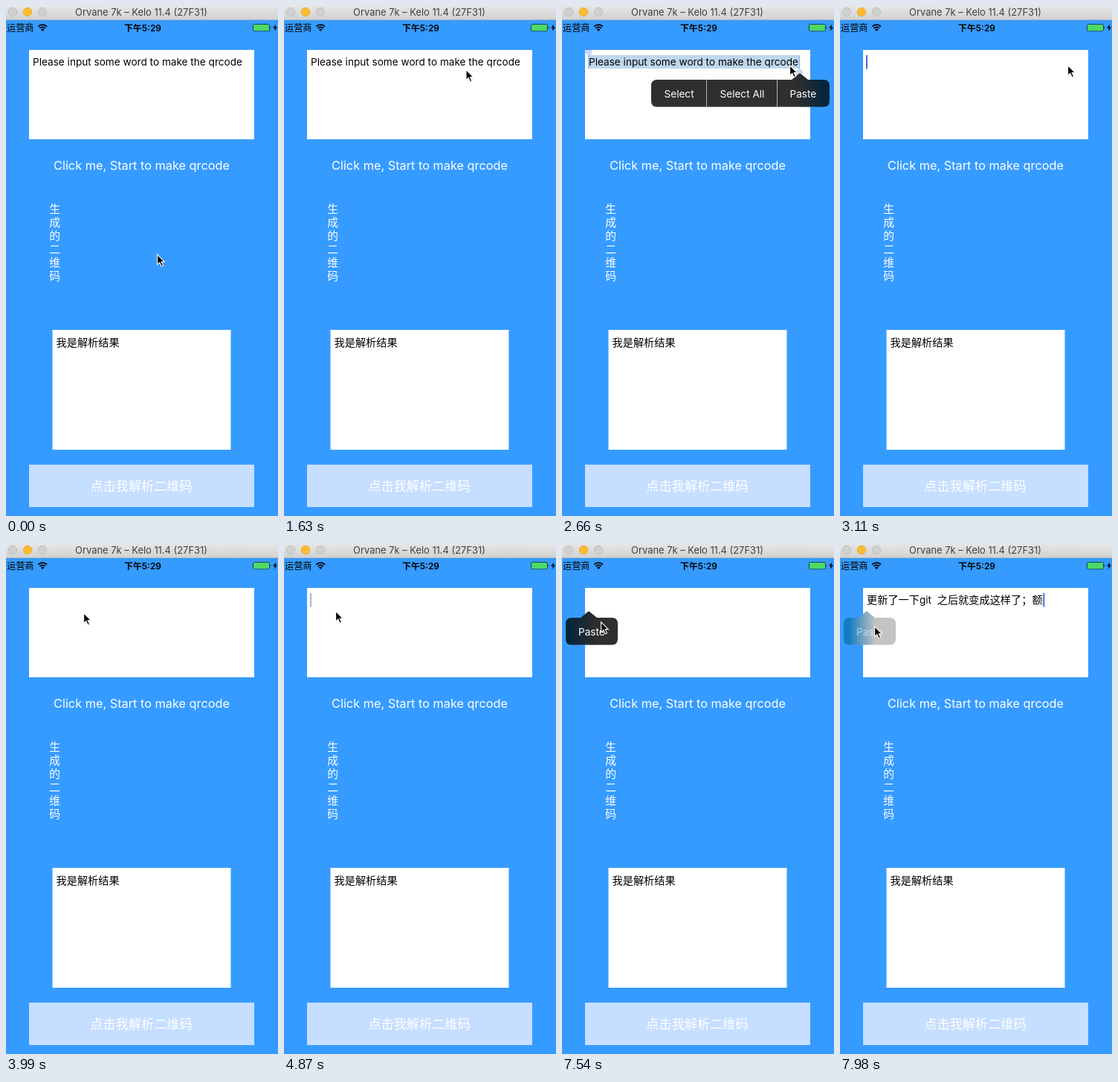
Write an HTML page that moves like this. It is 366 px wide and 685 px high and loops after 8000 ms.

```html
<!DOCTYPE html>
<html lang="en">
<head>
<meta charset="utf-8">
<title>QR code maker</title>
<style>
  html, body { margin: 0; width: 100%; height: 100%; overflow: hidden; background: #369bff; }
  svg { display: block; width: 366px; height: 685px; font-family: Inter, "Noto Sans CJK SC", "Noto Sans CJK", sans-serif; }
  .body { font-size: 13.6px; }
  .cjk { font-size: 14.2px; }
  .white { fill: #fff; }
  .mid { text-anchor: middle; }
  text { white-space: pre; }
</style>
</head>
<body>
<svg viewBox="0 0 366 685" lang="zh-CN">
  <defs id="defs">
    <linearGradient id="bar" x2="0" y2="1">
      <stop stop-color="#e6e6e6"/><stop offset="1" stop-color="#d2d2d2"/>
    </linearGradient>
  </defs>

  <rect width="366" height="685" fill="#369bff"/>

  <!-- window title -->
  <rect width="366" height="18" fill="url(#bar)"/>
  <rect y="18" width="366" height="1" fill="#b5b9be"/>
  <g stroke-width=".8">
    <circle cx="9" cy="8" r="5.7" fill="#d0d0d0" stroke="#bababa"/>
    <circle cx="29" cy="8" r="5.7" fill="#fdbc2e" stroke="#e3a62b"/>
    <circle cx="49" cy="8" r="5.7" fill="#d0d0d0" stroke="#bababa"/>
  </g>
  <text class="mid" x="182" y="13" font-size="12.9" fill="#404040">Orvane 7k – Kelo 11.4 (27F31)</text>

  <!-- status bar -->
  <text x="1" y="33.6" font-size="12.2">运营商</text>
  <g fill="none" stroke="#000" stroke-width="1.7">
    <path d="M43.3 27.6a8.2 8.2 0 0 1 11.8 0M45.4 30a5.4 5.4 0 0 1 7.6 0"/>
    <path d="M49.2 34l-2.3-2.4a3.3 3.3 0 0 1 4.6 0z" fill="#000" stroke="none"/>
  </g>
  <text class="mid" x="184" y="33.6" font-size="11.9" font-weight="600">下午5:29</text>
  <rect x="332.5" y="24.5" width="22" height="9.2" rx="1.8" fill="none" stroke="#000" stroke-width=".6"/>
  <rect x="333" y="25" width="21" height="8.2" rx="1.2" fill="#4cd964"/>
  <path d="M355.5 27.5q1.6 1.6 0 3.2z"/>
  <path d="M363.4 24.6l-4.4 5h2.8l-1 4.2 4.4-5.2h-2.8z"/>

  <!-- page -->
  <rect x="31" y="59" width="303" height="120" fill="#fff"/>
  <text class="white mid" x="182.5" y="219.7" font-size="16.3">Click me, Start to make qrcode</text>
  <g id="column" class="white mid" font-size="14.8"></g>
  <rect x="62.5" y="435" width="240" height="161" fill="#fff"/>
  <text class="cjk" x="67.5" y="456.5">我是解析结果</text>
  <rect x="31" y="616" width="303" height="57" fill="#c6deff"/>
  <text class="white mid" x="182" y="650.7" font-size="17.2">点击我解析二维码</text>

  <!-- text field -->
  <rect id="range" x="35" y="66" width="285" height="18" fill="#bfd7ee"/>
  <text id="hint" class="body" x="36" y="80.3">Please input some word to make the qrcode</text>
  <text id="pasted" class="cjk" x="36" y="80.3">更新了一下<tspan class="body">git  </tspan>之后就变成这样了；额</text>
  <g id="grips" fill="#4a72e0">
    <circle cx="36" cy="61.5" r="4.8"/><rect x="35" y="65" width="1.6" height="19"/>
    <circle cx="319.5" cy="89.5" r="4.8"/><rect x="318.8" y="66" width="1.6" height="19"/>
  </g>
  <rect id="caret" y="66" width="2" height="18.5" fill="#4a6ddf"/>

  <g id="editMenu"></g>
  <g id="pasteMenu"></g>

  <g id="pointer">
    <path d="M1 2V15.4l3.2-2.9 2.3 5.3 2.6-1.1-2.3-5.1h4.3z" fill="#000" opacity=".22"/>
    <path d="M.6 .8V14.4l3.2-2.9 2.3 5.3 2.4-1-2.3-5.2h4.2z" stroke="#fff" stroke-width="1.1"/>
  </g>
</svg>

<script>
const LOOP = 8000, STEP = 147.8;   // the picture is refreshed once per step
const SELECT = 18, CLEAR = 21, PASTE = 54;   // edits, in steps
const el = id => document.getElementById(id);
const clamp = v => Math.min(1, Math.max(0, v));
const ramp = (n, from, to) => clamp((n - from) / (to - from));
const fade = (id, alpha) => el(id).setAttribute('opacity', alpha);

// Pointer strokes: start step, end step, destination.
const home = [203, 333];
const strokes = [
  [0, 2, 207, 373], [2, 6, 152, 116], [8, 13, 306, 79], [23, 27, 104, 92],
  [27, 30, 71, 91], [31, 33, 67, 89], [46, 50, 52, 104], [51, 53, 46, 110]
];

// Steady sideways, slowing down vertically.
function pointerAt(n) {
  let [x, y] = home;
  for (const [from, to, tx, ty] of strokes) {
    const p = ramp(n, from, to);
    x += (tx - x) * p;
    y += (ty - y) * (1 - (1 - p) ** 2);
  }
  return `translate(${x} ${y})`;
}

function caretAlpha(n) {
  if (n < 13 || (n >= SELECT && n < CLEAR)) return 0;
  const steady = n < 26 || (n >= 42 && n < 47);
  return steady ? 1 : clamp(.5 - Math.sin((n - 32) * Math.PI / 3));
}

function addGradient(id, x1, x2, from, to) {
  el('defs').innerHTML +=
    `<linearGradient id="${id}" gradientUnits="userSpaceOnUse" x1="${x1}" x2="${x2}" y1="0" y2="0">` +
    `<stop stop-color="${from}"/><stop offset="1" stop-color="${to}"/></linearGradient>`;
}

// A blurred backdrop under a dark tint; only the tint and labels fade.
function buildMenu(id, x, width, tip, edge, items, lines) {
  const r = x + width;
  const shape = `M${x + 8} 99H${tip - 11}L${tip - 1.5} 91.2q1.5-1.2 3 0L${tip + 11} 99H${r - 8}` +
    `q8 0 8 8v20.5q0 8-8 8H${x + 8}q-8 0-8-8V107q0-8 8-8z`;
  addGradient(id + 'Blur', ...edge, '#189ffa', '#fff');
  addGradient(id + 'Tint', ...edge, '#06263a', '#2f2f2f');
  el(id).innerHTML =
    `<path fill="url(#${id}Blur)" d="${shape}"/><path id="${id}Dark" fill="url(#${id}Tint)" d="${shape}"/>` +
    `<g id="${id}Label">` +
    lines.map(l => `<rect x="${l}" y="99" width="1" height="36.5" fill="#b4b4b4"/>`).join('') +
    items.map(([label, left]) => `<text class="body white" x="${left}" y="122.6">${label}</text>`).join('') +
    '</g>';
}

function showMenu(id, alpha) {
  fade(id, alpha > 0 ? 1 : 0);
  fade(id + 'Dark', alpha);
  fade(id + 'Label', Math.sqrt(alpha));
}

function draw(t) {
  const n = Math.floor((t + 4) / STEP);
  const selected = n >= SELECT && n < CLEAR;
  el('pointer').setAttribute('transform', pointerAt(n));
  el('caret').setAttribute('x', n < CLEAR ? 319 : n < PASTE ? 35 : 273.3);
  fade('caret', caretAlpha(n));
  fade('hint', n < CLEAR ? 1 : 0);
  fade('pasted', n >= PASTE ? 1 : 0);
  fade('range', selected ? 1 : 0);
  fade('grips', selected ? ramp(n, 17.6, 19) : 0);
  showMenu('editMenu', n < 19 ? ramp(n, 14, 16) : 0);
  showMenu('pasteMenu', ramp(n, 48, 50) * (1 - ramp(n, 53, 54.4)));
}

buildMenu('editMenu', 120, 240, 320, [352, 314],
  [['Select', 137.5], ['Select All', 212.5], ['Paste', 306.5]], [194, 289]);
buildMenu('pasteMenu', 5, 70, 36, [12, 48], [['Paste', 22]], []);

el('column').innerHTML = [...'生成的二维码']
  .map((c, i) => `<text x="65.7" y="${278.3 + i * 17.9}">${c}</text>`).join('');

const start = performance.now();
function tick() {
  draw((performance.now() - start) % LOOP);
  requestAnimationFrame(tick);
}
draw(0);
requestAnimationFrame(tick);
</script>
</body>
</html>
```
